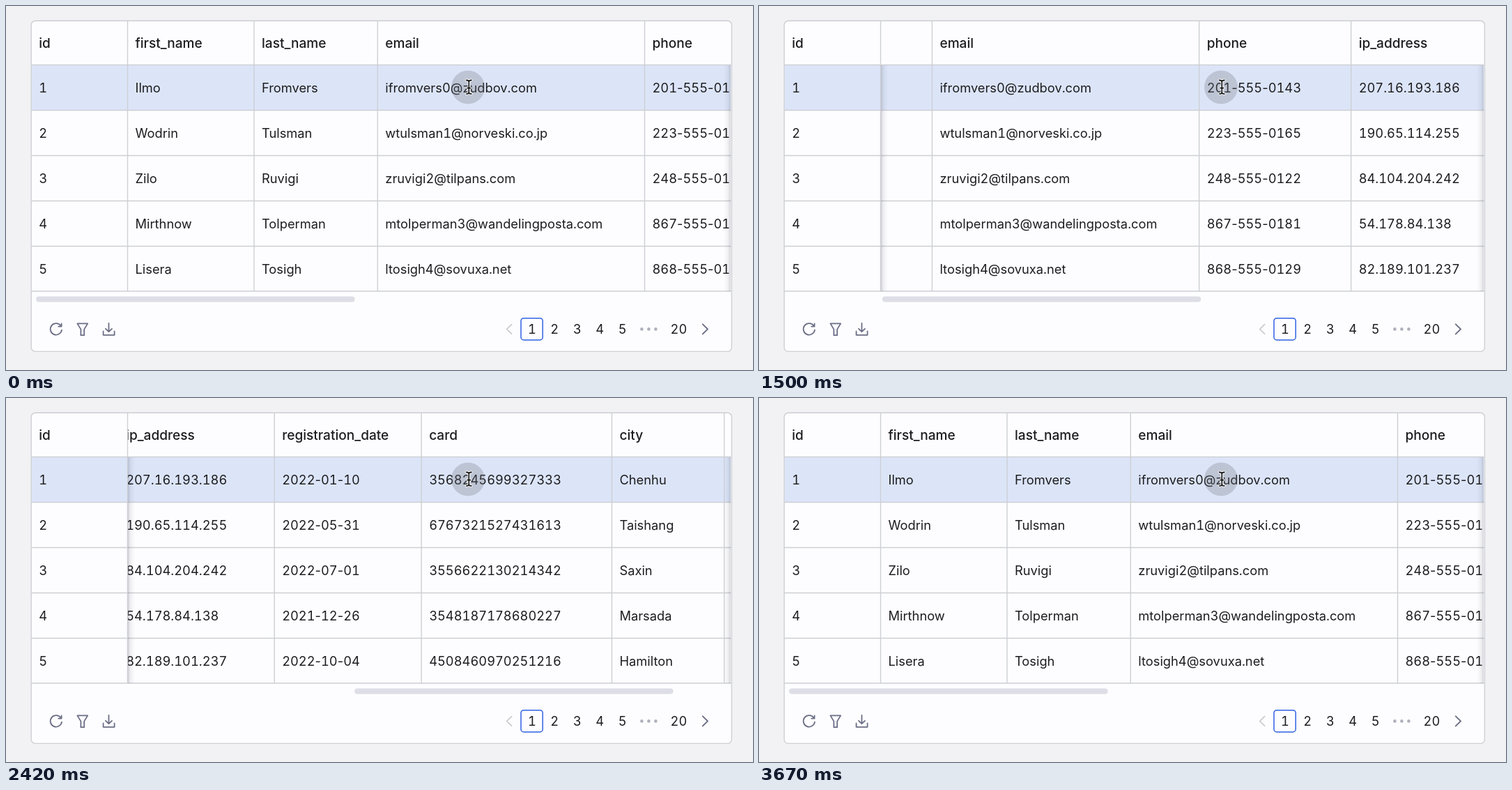
These frames come from a looping animation (1072 px wide and 522 px high, 4830 ms). An HTML page:

```html
<!DOCTYPE html>
<html lang="en">
<head>
<meta charset="utf-8">
<title>Table with horizontal scroll</title>
<style>
  html, body { margin: 0; width: 100%; height: 100%; overflow: hidden; background: #f2f2f5; }
  svg { display: block; width: 1072px; height: 522px; }
  text { font: 400 18.3px Inter, sans-serif; font-variant-numeric: tabular-nums; fill: #1d1d20; white-space: pre; }
  .head { font-size: 19.1px; font-weight: 500; }
  .dash { font-variant-numeric: normal; }
  .page { text-anchor: middle; }
  .line { stroke: #cdcfd4; stroke-width: 1.4; fill: none; }
  .icon { stroke: #6b6e85; stroke-width: 1.8; fill: none; stroke-linecap: round; stroke-linejoin: round; }
</style>
</head>
<body>
<svg viewBox="0 0 1072 522">
  <defs>
    <clipPath id="view"><rect x="174.5" y="21" width="865.5" height="389"/></clipPath>
    <linearGradient id="fade">
      <stop offset="0" stop-color="#28283c" stop-opacity=".18"/>
      <stop offset=".4" stop-color="#28283c" stop-opacity=".06"/>
      <stop offset="1" stop-color="#28283c" stop-opacity="0"/>
    </linearGradient>
    <path id="beam" d="M660.6 106.4Q664.3 106.4 664.3 109V123.4Q664.3 126 660.6 126M668 106.4Q664.3 106.4 664.3 109M664.3 123.4Q664.3 126 668 126M662 117.6H666.6"/>
  </defs>
  <rect class="line" x="36.2" y="21.2" width="1005.2" height="474.2" rx="6" style="fill:#fdfdff"/>
  <rect x="37" y="85" width="1003" height="64.5" fill="#dce5f8"/>
  <g id="rules"></g>
  <g clip-path="url(#view)"><g id="cells"></g></g>
  <g id="fixed"></g>
  <rect id="leftShade" x="175" y="85" width="10" height="324" fill="url(#fade)"/>
  <rect x="-1040" y="85" width="10" height="324" fill="url(#fade)" transform="scale(-1 1)"/>
  <rect id="thumb" y="416.6" width="457.5" height="8" rx="4" fill="#dedee7"/>

  <g class="icon">
    <path d="M78.6 458.6A8.2 8.2 0 1 0 80 464.6M79.6 455.4V459.6H75.2"/>
    <path d="M102.4 455.4H117.2L112.2 463.6V472.2H107.4V463.6Z"/>
    <path d="M147.5 455V467M143 462.8L147.5 467.2L152 462.8M139.6 466.4V471.8H155.6V466.4"/>
    <path d="M725.6 456.6L718.6 463.4L725.6 470.2" stroke="#cbccd3"/>
    <path d="M999.8 456.4L1007 463.4L999.8 470.4" stroke-width="2"/>
  </g>
  <rect x="739" y="447.7" width="31.2" height="31.2" rx="4" fill="#fdfdff" stroke="#2f62e4" stroke-width="1.5"/>
  <g fill="#aeb0bb">
    <circle cx="912.4" cy="463.4" r="2.3"/><circle cx="922.4" cy="463.4" r="2.3"/><circle cx="932.4" cy="463.4" r="2.3"/>
  </g>
  <g id="pages"></g>

  <circle cx="663" cy="116.5" r="24" fill="#6e7078" fill-opacity=".28"/>
  <g fill="none" stroke-linecap="round">
    <use href="#beam" stroke="#fff" stroke-width="3.6"/>
    <use href="#beam" stroke="#0c0c0e" stroke-width="1.6"/>
  </g>
</svg>
<script>
const LOOP = 4830, LEFT = 174.5, HEAD = 84.5, ROW = 65;

const columns = [
  ['first_name', 181.5, 'Ilmo Wodrin Zilo Mirthnow Lisera'],
  ['last_name', 177.3, 'Fromvers Tulsman Ruvigi Tolperman Tosigh'],
  ['email', 383.2, 'ifromvers0@zudbov.com wtulsman1@norveski.co.jp zruvigi2@tilpans.com mtolperman3@wandelingposta.com ltosigh4@sovuxa.net'],
  ['phone', 218, '201-555-0143 223-555-0165 248-555-0122 867-555-0181 868-555-0129'],
  ['ip_address', 224, '207.16.193.186 190.65.114.255 84.104.204.242 54.178.84.138 82.189.101.237'],
  ['registration_date', 211, '2022-01-10 2022-05-31 2022-07-01 2021-12-26 2022-10-04'],
  ['card', 273.3, '3568245699327333 6767321527431613 3556622130214342 3548187178680227 4508460970251216'],
  ['city', 161.2, 'Chenhu Taishang Saxin Marsada Hamilton']
];

const $ = id => document.getElementById(id);

function add(parent, tag, attrs, content = '') {
  const node = document.createElementNS('http://www.w3.org/2000/svg', tag);
  for (const key in attrs) node.setAttribute(key, attrs[key]);
  node.innerHTML = content;
  $(parent).appendChild(node);
}

const line = (parent, d) => add(parent, 'path', { d, class: 'line' });

// Digits are tabular, hyphens keep their natural width.
const dashed = value => String(value).replaceAll('-', '<tspan class="dash">-</tspan>');

function column(parent, x, name, values) {
  add(parent, 'text', { x, y: 59.8, class: 'head' }, name);
  values.forEach((value, i) => add(parent, 'text', { x, y: 123.8 + i * ROW }, dashed(value)));
}

function build() {
  for (let i = 0; i < 6; i++) line('rules', `M36 ${HEAD + i * ROW - (i > 4 ? 0.5 : 0)}H1040.5`);

  let x = LEFT;
  for (const [name, width, values] of columns) {
    column('cells', x + 11, name, values.split(' '));
    x += width;
    line('cells', `M${x} 21V409`);
  }
  column('fixed', 47.3, 'id', [1, 2, 3, 4, 5]);
  line('fixed', `M${LEFT} 21V409`);

  [1, 2, 3, 4, 5].forEach(n => add('pages', 'text', { x: 722.4 + n * 32.45, y: 470.2, class: 'page' }, n));
  add('pages', 'text', { x: 965.4, y: 470.2, class: 'page' }, 20);
}

const clamp = v => Math.min(1, Math.max(0, v));

// The picture refreshes in alternating holds of 170 and 80 ms.
function tick(t) {
  if (t < 750) return 0;
  const rest = (t - 750) % 250;
  return t - rest + (rest >= 170 ? 170 : 0);
}

// Two flicks to the right, a pause, one flick back.
function scrollAt(t) {
  if (t < 750) return 0;
  if (t < 1000) return 1.5 + 135.5 * ((t - 750) / 250) ** 1.6;
  if (t < 1620) return 295 - 158 * Math.exp((1000 - t) / 182);
  if (t < 1920) return 291 + 420 * ((t - 1620) / 300) ** 2.2;
  if (t < 2920) return 988.5 - 277.5 * Math.exp((1920 - Math.min(t, 2670)) / 172);
  return Math.max(0, 178.5 * Math.exp((3170 - t) / 165) - 100);
}

function draw(time) {
  const t = tick(time % LOOP);
  const x = scrollAt(t);
  $('cells').setAttribute('transform', `translate(${-x} 0)`);
  $('thumb').setAttribute('x', 43.1 + x * 0.4695);
  $('leftShade').setAttribute('opacity', clamp((t - 800) / 250) * clamp((3565 - t) / 300));
}

build();
const start = performance.now();
function loop() {
  draw(performance.now() - start);
  requestAnimationFrame(loop);
}
loop();
</script>
</body>
</html>
```
